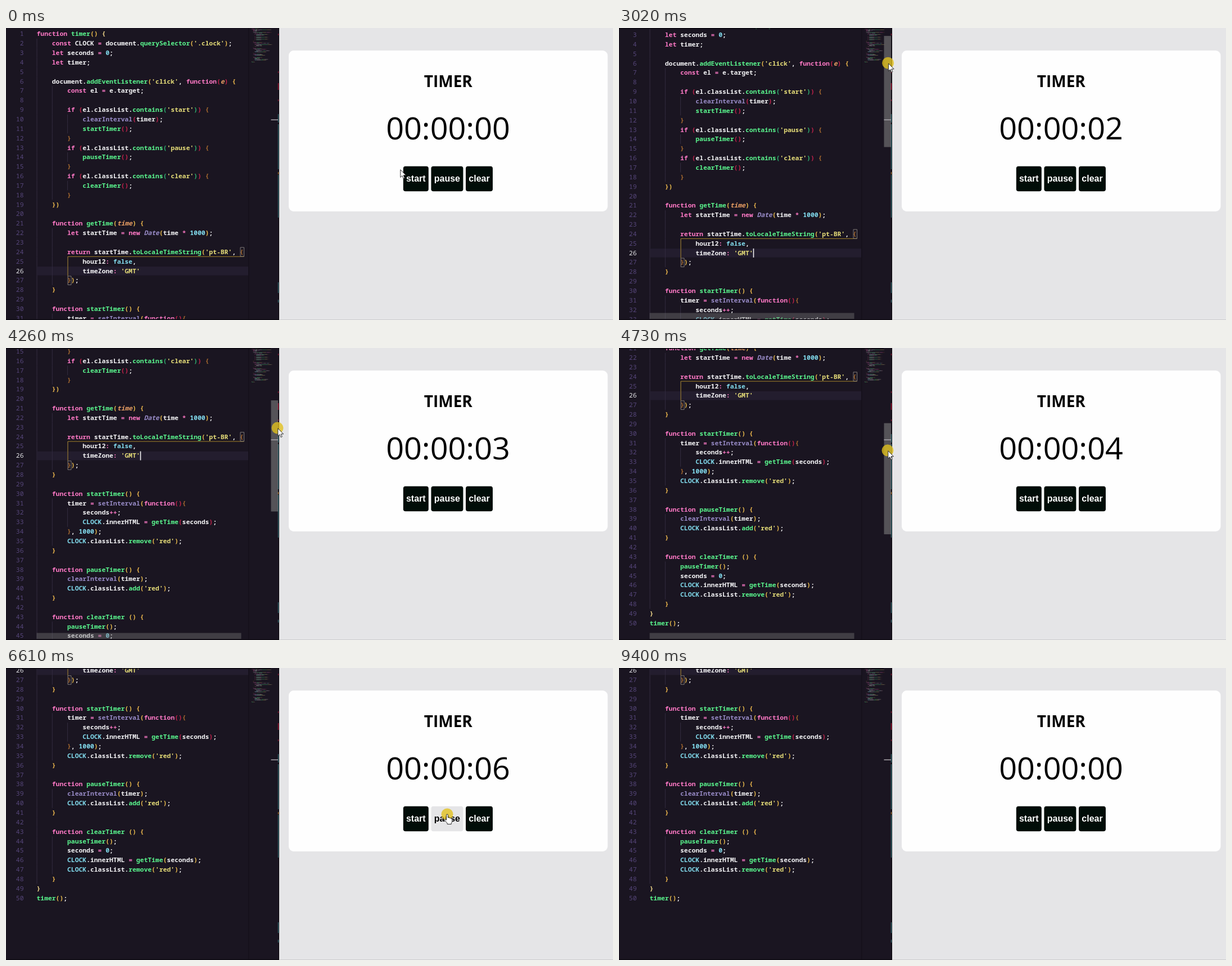
These frames come from a looping animation (1080x519 px, 9480 ms). An HTML page:

```html
<!DOCTYPE html>
<html lang="en">
<head>
<meta charset="utf-8">
<title>Timer</title>
<style>
  html, body { margin: 0; width: 100%; height: 100%; overflow: hidden; background: #e5e5e7; }
  svg { position: absolute; left: 0; top: 0; display: block; }
  #rows text { font: 600 11.37px "Noto Sans Mono", "DejaVu Sans Mono", monospace; white-space: pre; }
  #rows .num { font-weight: 500; fill: #56467a; text-anchor: end; }
  #rows .num.on { fill: #e6e6ea; }
  .card text { text-anchor: middle; }
  .title { font: 700 28px "Open Sans", "Noto Sans", sans-serif; }
  #clock { font: 400 55.7px "Open Sans", "Noto Sans", sans-serif; }
  .btn rect { fill: #010d08; }
  .btn text { font: 700 15.96px "Liberation Sans", Arial, sans-serif; fill: #fff; }
  .btn.hover rect { fill: #e5e5e7; }
  .btn.hover text { fill: #000; }
</style>
</head>
<body>
<svg width="1080" height="519" viewBox="0 0 1080 519">
  <defs>
    <clipPath id="pane"><rect width="431" height="517.5"/></clipPath>
  </defs>

  <rect width="486" height="519" fill="#1a1521"/>
  <g clip-path="url(#pane)"><g id="rows"></g></g>
  <rect x="431" width="1.5" height="519" fill="#14101a"/>
  <g id="map"></g>
  <rect id="slider" x="432" y="2" width="39" height="35" fill="#797979" opacity=".2"/>
  <rect id="shade" width="471" height="1.6" fill="#0b0810"/>
  <g id="bars">
    <rect id="vbar" x="471.5" width="12.5" height="197.5" fill="#797979"/>
    <rect x="54.5" y="506.5" width="364" height="10.5" fill="#797979" opacity=".4"/>
  </g>
  <g id="marks"></g>
  <rect x="471.5" y="162.5" width="12.5" height="1.5" fill="#a9a6ac"/>
  <rect x="485" width="1" height="519" fill="#08060a"/>
  <rect y="517.6" width="486" height="1.4" fill="#0d0a12"/>
  <rect x="486" y="518" width="594" height="1" fill="#cbcbcd"/>

  <g class="card">
    <rect x="503" y="40" width="567.5" height="286" rx="9" fill="#fefefe"/>
    <text class="title" x="786.8" y="104.8">TIMER</text>
    <text id="clock" x="786.5" y="198">00:00:00</text>
    <g id="buttons"></g>
  </g>

  <g id="pointer">
    <circle id="press" r="10.5" fill="#e3c21c" opacity=".78"/>
    <path id="arrow" d="M.8.8V14.4L4 11.6 6.1 16.5 8.3 15.6 6.2 10.8H10.6Z"
          fill="#fff" stroke="#1a1a1a" stroke-width=".9"/>
    <path id="hand" d="M-1.4 1.3Q-1.4 0 0 0T1.4 1.3V6Q3.8 5 4.2 6.8 6 5.9 6.6 7.5 8.8 7 8.8 9V12.5Q8.4 14.5 7.2 15.8V17.6H.2V16Q-2 13.6-4.4 10.4-5 8.6-3 8.8L-1.4 10.2Z"
          fill="#fff" stroke="#111" stroke-width=".9"/>
  </g>
</svg>

<script>
const LOOP = 9480, LINE = 16.85, CHAR = 6.822, LEFT = 54.5;
const $ = id => document.getElementById(id);

function add(parent, tag, attrs, text) {
  const node = document.createElementNS('http://www.w3.org/2000/svg', tag);
  for (const key in attrs) node.setAttribute(key, attrs[key]);
  if (text !== undefined) node.textContent = text;
  parent.appendChild(node);
  return node;
}
const box = (parent, x, y, width, height, fill, more) =>
  add(parent, 'rect', { x, y, width, height, fill, ...more });

const CODE = `function timer() {
    const CLOCK = document.querySelector('.clock');
    let seconds = 0;
    let timer;

    document.addEventListener('click', function(e) {
        const el = e.target;

        if (el.classList.contains('start')) {
            clearInterval(timer);
            startTimer();
        }
        if (el.classList.contains('pause')) {
            pauseTimer();
        }
        if (el.classList.contains('clear')) {
            clearTimer();
        }
    })

    function getTime(time) {
        let startTime = new Date(time * 1000);

        return startTime.toLocaleTimeString('pt-BR', {
            hour12: false,
            timeZone: 'GMT'
        });
    }

    function startTimer() {
        timer = setInterval(function(){
            seconds++;
            CLOCK.innerHTML = getTime(seconds);
        }, 1000);
        CLOCK.classList.remove('red');
    }

    function pauseTimer() {
        clearInterval(timer);
        CLOCK.classList.add('red');
    }

    function clearTimer () {
        pauseTimer();
        seconds = 0;
        CLOCK.innerHTML = getTime(seconds);
        CLOCK.classList.remove('red');
    }
}
timer();`.split('\n');

const INK = { key: '#ff79c6', call: '#5af78e', text: '#f4f4f6', str: '#e7de79',
              num: '#82dcee', lib: '#988bc7', arg: '#e89e64' };
const PARENS = ['#eebf4e', '#c4224c', '#2fb573'];
const BRACES = ['#efd68a', '#eab54c', '#a5692f'];
const depth = { '(': 0, '{': 0 };

function bracket(ch) {
  const open = '({'.includes(ch) ? ch : ch === ')' ? '(' : '{';
  const level = ch === open ? depth[open]++ : --depth[open];
  return (open === '(' ? PARENS : BRACES)[level];
}

function colour(word, rest, before, row) {
  if (/^[(){}]$/.test(word)) return bracket(word);
  if (word[0] === "'") return INK.str;
  if (/^(function|const|let|if|return|new|[=*:]|\+\+)$/.test(word)) return INK.key;
  if (/^(\d+|false)$/.test(word)) return INK.num;
  if (/^(clearInterval|setInterval|Date)$/.test(word)) return INK.lib;
  if (/function ?\w*\($/.test(before) && /^\w/.test(word)) return INK.arg;
  if (/^\w/.test(word) && /^ ?\(/.test(rest)) return INK.call;
  if (word === 'CLOCK' && row > 1) return INK.num;
  return INK.text;
}

function buildCode() {
  const rows = $('rows');
  box(rows, 56, 25 * LINE + 2.8, 375, 15.6, '#231d2e');
  const indent = i => CODE[i] ? CODE[i].search(/\S/) / 4 : indent(i + 1);

  CODE.forEach((line, i) => {
    for (let k = 0; k < indent(i); k++)
      box(rows, LEFT + k * 4 * CHAR, i * LINE + 2, 1, LINE, '#332c40');
    const y = 14.3 + i * LINE;
    add(rows, 'text', { x: 31.5, y, class: i === 25 ? 'num on' : 'num' }, i + 1);
    const text = add(rows, 'text', { x: LEFT, y });
    for (const m of line.matchAll(/'[^']*'|\w+|\+\+|\s+|./g)) {
      const word = m[0], end = m.index + word.length;
      if (/^\s/.test(word)) { add(text, 'tspan', {}, word); continue; }
      const fill = colour(word, line.slice(end), line.slice(0, m.index), i);
      const span = add(text, 'tspan', { fill }, word);
      if (fill === INK.arg || word === 'Date') span.style.fontStyle = 'italic';
      box($('map'), 437 + m.index * 0.68, 1.5 + i * 1.2, word.length * 0.68, 0.75, fill, { opacity: 0.42 });
    }
  });

  const frame = { fill: 'none', 'stroke-width': 1 };
  add(rows, 'path', { d: 'M423.5 406.3H110V441', stroke: '#a58329', ...frame });
  add(rows, 'path', { d: 'M417 390h6.5v16h-6.5zM110 441h6v15.5h-6z', stroke: '#807b78', ...frame });
  box(rows, 238.6, 423.8, 1.6, 16, '#f0f0f2', { id: 'caret' });
}

function buildMarks() {
  const teal = '#3c8088', red = '#a8173c';
  [[10, 3, red], [77, 3, red], [98, 12, '#d0143c'], [127, 3, red], [153, 15, teal], [171, 80, teal],
   [256, 4, '#c98a35'], [261, 76, teal], [452, 19, teal], [483, 5, teal]]
    .forEach(([y, h, fill]) => box($('marks'), 484, y, 1, h, fill));
}

const buttons = [['start', 706.8, 45], ['pause', 756.4, 57], ['clear', 818, 48]].map(([name, x, w]) => {
  const node = add($('buttons'), 'g', { class: 'btn' });
  box(node, x, 245.7, w, 44.6, '', { rx: 4 });
  add(node, 'text', { x: x + w / 2, y: 273 }, name);
  return { node, x, w };
});

// Rows of [time, values...], joined by straight lines.
const PATH = [
  [0, 701, 251], [80, 701, 251], [230, 709, 261], [840, 709, 261],
  [1200, 600, 210], [1620, 400, 150], [1770, 400, 145], [2000, 436, 106],
  [2400, 462, 66], [2700, 478, 50], [2800, 478, 50], [3490, 480, 88],
  [4260, 483, 142], [4730, 478, 182], [5280, 473.5, 211.5], [5760, 473.5, 212],
  [6100, 610, 240], [6440, 785, 260], [7080, 785, 260], [7350, 812, 328],
  [7700, 844, 280.7], [8550, 844, 280.7], [9090, 1030, 520], [LOOP, 1030, 520]
];
const SCROLL = [[0, 0], [2800, 0], [3490, 99.6], [4260, 240], [4730, 347],
                [5280, 425.5], [5380, 427.3], [LOOP, 427.3]];
const BARS = [[0, 0], [1380, 0], [1480, 1], [5860, 1], [6600, 0], [LOOP, 0]];
const PRESSES = [[380, 600], [2780, 5650], [6590, 6740], [7700, 7900]];
const CARET = [[150, 460], [2950, 3450], [3950, 4450], [4950, 5450], [5950, 6440]];

function track(keys, t) {
  const i = Math.max(1, keys.findIndex(k => k[0] > t));
  const a = keys[i - 1], b = keys[i], p = (t - a[0]) / (b[0] - a[0]);
  return a.slice(1).map((v, j) => v + (b[j + 1] - v) * p);
}
const within = (spans, t) => spans.some(([from, to]) => t >= from && t < to);
const show = (id, on) => { $(id).style.display = on ? '' : 'none'; };

function draw(t) {
  const [x, y] = track(PATH, t), [scroll] = track(SCROLL, t);
  const pressed = within(PRESSES, t);

  $('rows').setAttribute('transform', `translate(0 ${-scroll})`);
  $('vbar').setAttribute('y', 2 + scroll * 0.379);
  $('vbar').setAttribute('opacity', pressed ? 0.62 : 0.45);
  $('bars').setAttribute('opacity', track(BARS, t)[0]);
  show('shade', scroll > 0);
  show('slider', t > 1900 && t < 2600);
  show('caret', within(CARET, t));

  let over = false;
  for (const b of buttons) {
    const hit = x > b.x && x < b.x + b.w && y > 246 && y < 290;
    b.node.classList.toggle('hover', hit);
    over = over || hit;
  }
  $('pointer').setAttribute('transform', `translate(${x} ${y})`);
  show('pointer', t < 9100);
  show('press', pressed);
  show('hand', over);
  show('arrow', !over);

  const seconds = t < 7900 ? Math.max(0, Math.min(6, Math.floor((t - 570) / 1000))) : 0;
  $('clock').textContent = '00:00:0' + seconds;
  $('clock').setAttribute('fill', t >= 6740 && t < 7900 ? '#f00' : '#000');
}

buildCode();
buildMarks();
const start = performance.now();
function tick() {
  draw((performance.now() - start) % LOOP);
  requestAnimationFrame(tick);
}
tick();
</script>
</body>
</html>
```
